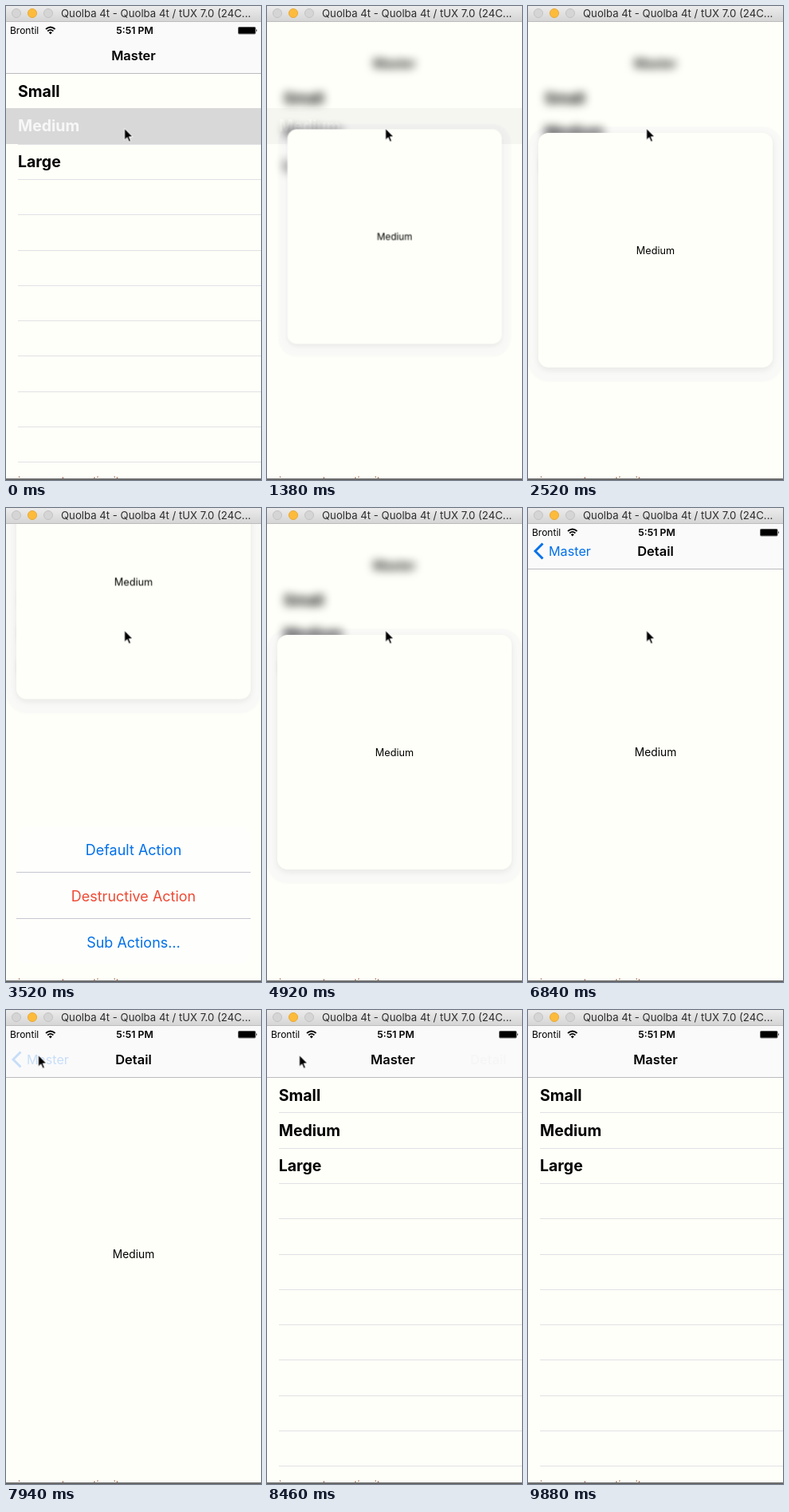
Write an HTML page that moves like this. It is 320x594 px and loops after 9.9 s.

```html
<!DOCTYPE html>
<html lang="en">
<head>
<meta charset="utf-8">
<title>Peek and pop</title>
<style>
  :root { --page: #fffff9; --blue: #0070ea; --line: #e1e1e6; }
  html, body { margin: 0; width: 100%; height: 100%; overflow: hidden; background: var(--page); }
  body { position: relative; font-family: Inter, Roboto, sans-serif; color: #000; }
  div, span, svg { position: absolute; box-sizing: border-box; white-space: nowrap; }
  .anim { animation: 9900ms ease-in-out infinite both; }

  /* window frame */
  .window { left: 0; top: 0; width: 320px; height: 20px; border-bottom: 1px solid #bdbdbd;
    background: linear-gradient(#ececec, #d5d5d5); }
  .window i { position: absolute; top: 3px; width: 12px; height: 12px; border-radius: 50%;
    box-sizing: border-box; background: #d5d5d5; border: 1px solid #c3c3c3; }
  .window .mid { background: #fdbb3c; border-color: #e9a935; }
  .window span { left: 69px; top: 0; font-size: 13.2px; line-height: 19px; color: #2c2c2c; }
  .under { left: 0; top: 589px; width: 320px; height: 5px; overflow: hidden; }
  .under span { left: 15px; top: 0; font-size: 12.5px; line-height: 12px; color: #8a4a2c; }
  .under::after { content: ""; position: absolute; left: 0; top: 3px; width: 100%; height: 2px; background: #6c6c6c; }

  .screen { left: 0; top: 20px; width: 320px; height: 572px; overflow: hidden; background: var(--page); }
  .fill { inset: 0; }

  /* master */
  .rows { top: 64.5px; height: 508px; left: 15px; right: 0;
    background: repeating-linear-gradient(transparent 0 43.3px, var(--line) 43.3px 44.3px); }
  .cell { left: 0; width: 320px; height: 44.3px; padding-left: 15px; font-size: 19.5px; font-weight: 700; line-height: 44.3px; }
  .hit { top: 108.2px; height: 45px; background: #d8d8d8; color: #f7f7f7; }
  .bar { left: 0; right: 0; top: 0; height: 65px; }
  .bg { inset: 0; background: #fafafb; border-bottom: 1px solid #bbbbbf; }
  .title { left: 0; width: 320px; bottom: 11px; line-height: 24px; text-align: center; font-size: 16.5px; font-weight: 600; }
  .status { left: 0; top: 0; width: 320px; height: 20px; font-size: 12px; line-height: 21px; }
  .status .net { left: 5px; }
  .status .clock { left: 0; width: 323px; text-align: center; font-size: 12.3px; font-weight: 600; }
  .status svg { left: 0; top: 0; }

  /* detail */
  .card { inset: 139px 13px; border-radius: 13px; background: var(--page);
    box-shadow: 0 3px 8px rgba(30,30,50,.08), 0 5px 2px 13px rgba(100,100,210,.04); }
  .label { inset: 0; display: flex; align-items: center; justify-content: center; font-size: 13.8px; }
  .back { left: 7px; bottom: 11px; width: 80px; height: 24px; color: var(--blue); }
  .back svg { left: 0; top: 1px; }
  .back span { left: 19px; line-height: 24px; font-size: 16.2px; }

  .sheet { left: 13px; top: 379px; width: 294px; height: 173px; border-radius: 12px; overflow: hidden; background: #fefefc; }
  .sheet span { left: 0; width: 100%; height: 58px; line-height: 59px; text-align: center; font-size: 18px; color: var(--blue); }
  .sheet span + span { border-top: 1px solid #c6c6d2; }
  .sheet .warn { color: #ee4a35; }

  .cursor { left: 0; top: 0; overflow: visible; }

  .scene { transform-origin: 160px 286px; animation-name: recede; }
  .chrome { animation-name: chrome; }
  .list { animation-name: list; }
  .hit { animation-name: hit; }
  .card { animation-name: card; }
  .label { animation-name: label; }
  .sheet { animation-name: sheet; }
  .detail { animation-name: detail; }
  .back { animation-name: back; }
  .leave { animation-name: leave; }
  .enter { animation-name: enter; }
  .cursor { animation-name: cursor; }

  @keyframes recede {
    0%, 5.05% { transform: scale(1); filter: blur(0); }
    13.2%, 67.17% { transform: scale(.958); filter: blur(6px); }
    67.18%, 100% { transform: scale(1); filter: blur(0); }
  }
  @keyframes chrome {
    0%, 5.05% { opacity: 1; }
    12.12%, 67.17% { opacity: 0; }
    67.18%, 100% { opacity: 1; }
  }
  @keyframes list {
    0%, 67.17% { transform: none; }
    67.18%, 81.82% { transform: translateX(-96px); animation-timing-function: cubic-bezier(.25,.6,.3,1); }
    85.86%, 100% { transform: translateX(0); }
  }
  @keyframes hit {
    0%, 12.6% { opacity: 1; }
    14.6%, 100% { opacity: 0; }
  }
  @keyframes card {
    0%, 12.6% { opacity: 0; transform: translate(0, -100px) scale(.5); animation-timing-function: cubic-bezier(.2,.7,.3,1); }
    14%  { opacity: 1; }
    16.16%, 27.27% { opacity: 1; transform: translate(0, 0) scale(1); }
    33.33%, 42.42% { transform: translate(0, -213.5px) scale(1); }
    47.47% { transform: translate(0, 0) scale(1); }
    63.13% { inset: 139px 13px; border-radius: 13px; }
    67.17% { inset: 0; border-radius: 0; }
    81.82% { inset: 0; border-radius: 0; opacity: 1; transform: translate(0, 0) scale(1); animation-timing-function: cubic-bezier(.25,.6,.3,1); }
    85.86% { inset: 0; border-radius: 0; opacity: 1; transform: translate(334px, 0) scale(1); }
    85.87%, 100% { inset: 0; border-radius: 0; opacity: 0; transform: translate(334px, 0) scale(1); }
  }
  @keyframes label {
    0%, 63.13% { transform: scale(.92); }
    67.17%, 100% { transform: scale(1); }
  }
  @keyframes sheet {
    0%, 27.27% { transform: translateY(195px); }
    33.33%, 42.42% { transform: translateY(0); }
    47.47%, 100% { transform: translateY(195px); }
  }
  @keyframes detail {
    0%, 64.5% { opacity: 0; height: 57px; }
    67.17%, 71.72% { opacity: 1; height: 57px; }
    71.73%, 85.86% { opacity: 1; height: 65px; }
    85.87%, 100% { opacity: 0; height: 65px; }
  }
  @keyframes back {
    0%, 78.79% { opacity: 1; }
    78.8%, 81.82% { opacity: .2; }
    83.5%, 100% { opacity: 0; }
  }
  @keyframes leave {
    0%, 81.82% { opacity: 1; transform: none; }
    85.86%, 100% { opacity: 0; transform: translateX(120px); }
  }
  @keyframes enter {
    0%, 81.82% { opacity: 0; transform: translateX(-107px); }
    85.86%, 100% { opacity: 1; transform: none; }
  }
  @keyframes cursor {
    0%, 70.7% { transform: translate(148.6px, 153.4px); }
    77.78%, 85.86% { transform: translate(40.5px, 56.5px); }
    89.9%, 100% { transform: translate(-20px, 40px); }
  }
</style>
</head>
<body>
  <div class="screen">
    <div class="scene fill anim">
      <div class="list fill anim">
        <div class="rows chrome anim"></div>
        <div class="cell" style="top:64.5px">Small</div>
        <div class="cell" style="top:108.8px">Medium</div>
        <div class="cell" style="top:153.1px">Large</div>
      </div>
      <div class="bar">
        <div class="chrome fill anim"><div class="bg"></div><div class="status"></div></div>
        <span class="title">Master</span>
      </div>
    </div>
    <div class="cell hit anim">Medium</div>
    <div class="card anim"><div class="label anim">Medium</div></div>
    <div class="bar detail anim">
      <div class="bg"></div>
      <div class="status"></div>
      <div class="back anim">
        <svg width="14" height="22"><path d="M11.5 1.5 2 11l9.5 9.5" fill="none" stroke="currentColor" stroke-width="3"/></svg>
        <span>Master</span>
      </div>
      <span class="title leave anim">Detail</span>
      <span class="title enter anim">Master</span>
    </div>
    <div class="sheet anim">
      <span style="top:0">Default Action</span>
      <span class="warn" style="top:57px">Destructive Action</span>
      <span style="top:115px">Sub Actions…</span>
    </div>
  </div>

  <div class="window">
    <i style="left:7px"></i><i class="mid" style="left:27px"></i><i style="left:47px"></i>
    <span>Quolba 4t - Quolba 4t / tUX 7.0 (24C...</span>
  </div>
  <div class="under"><span>in present an action item</span></div>

  <svg class="cursor anim" width="12" height="18">
    <path d="M0 0V14.5L3.4 11.4 5.7 16.7 8 15.7 5.8 10.5H10.3Z" fill="#000" stroke="#fff" stroke-width="1" stroke-linejoin="round"/>
  </svg>

<script>
  // Both bars share the same status line.
  const status = `
    <span class="net">Brontil</span>
    <span class="clock">5:51 PM</span>
    <svg width="320" height="20">
      <g fill="none" stroke="#000" stroke-width="1.8">
        <path d="M50 9Q55.8 4 61.6 9M52.2 11.5Q55.8 8.3 59.4 11.5"/>
      </g>
      <path d="M53.8 13.2Q55.8 11.4 57.8 13.2L55.8 15.4Z"/>
      <rect x="291" y="6" width="22.5" height="9.4" rx="1.6" fill="#777"/>
      <rect x="291.8" y="6.8" width="21" height="7.8" rx="1"/>
      <path d="M314 8.8Q315.8 10.7 314 12.6Z"/>
    </svg>`;
  document.querySelectorAll('.status').forEach(el => { el.innerHTML = status; });
</script>
</body>
</html>
```
